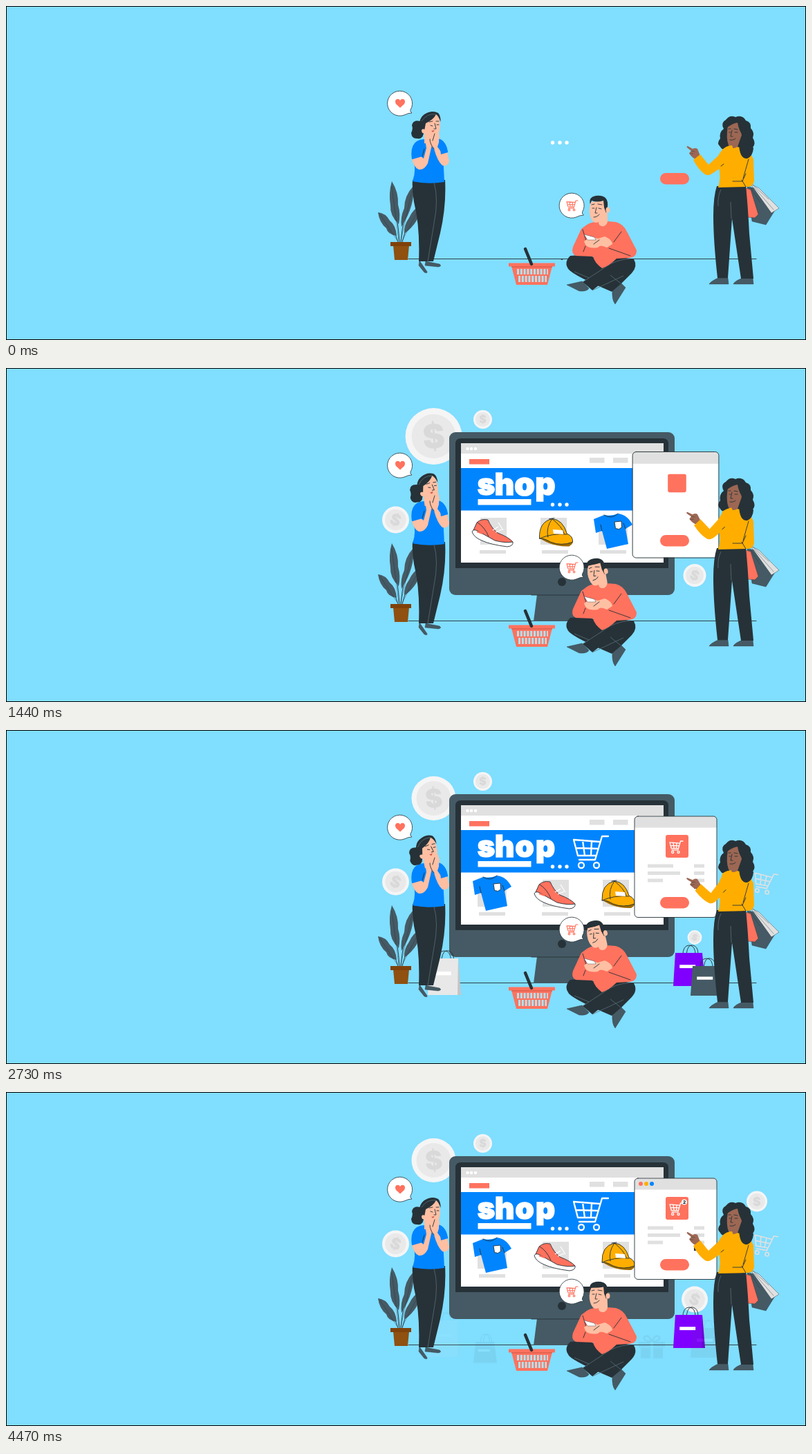
An HTML page for the animation above (4500 ms loop, 1157 px wide and 484 px high).

```html
<!DOCTYPE html>
<html lang="en">
<head>
<meta charset="utf-8">
<title>Online shopping</title>
<style>
html, body { margin: 0; width: 100%; height: 100%; overflow: hidden; background: #80deff; }
svg { display: block; width: 100%; height: 100%; }
.dark { fill: #263238; }
.slate { fill: #455a64; }
.red { fill: #ff725e; }
.blue { fill: #0085ff; }
.sun { fill: #ffae00; }
.white { fill: #fff; }
.grey { fill: #e0e0e0; }
.skin { fill: #ffbfa3; }
.tan { fill: #9c6753; }
.ink { fill: none; stroke: #263238; stroke-width: .9; stroke-linecap: round; stroke-linejoin: round; }
.seam { fill: none; stroke: #5b6d75; stroke-width: .8; }
.edge { stroke: #263238; stroke-width: .9; stroke-linejoin: round; }
.thin { stroke-width: .4; }
text { font-family: Inter, sans-serif; font-weight: 900; text-anchor: middle; }
#word { font-size: 43.5px; stroke: #fff; stroke-width: 1.6; }
</style>
</head>
<body>
<svg viewBox="0 0 1157 484" preserveAspectRatio="none">
<defs>
  <clipPath id="glass"><rect x="658" y="109" width="293" height="173"/></clipPath>
  <clipPath id="panel"><rect x="909" y="125" width="119" height="146" rx="5"/></clipPath>
  <g id="cart" fill="none" stroke-linejoin="round" stroke-linecap="round">
    <path d="M50 0H41L31 34H8M0 5L38 8M0 5L6 28H33M3 17L36 18M13 6L16 28M26 7L25 28"/>
    <circle cx="11" cy="42" r="4"/><circle cx="33" cy="42" r="4"/>
  </g>
  <path id="bubble" d="M15 9.5A18 18 0 1 0 6 17Q12 14 17 14Q14 12 15 9.5Z" fill="#fff" stroke="#263238" stroke-width=".8"/>
</defs>

<rect width="1157" height="484" fill="#80deff"/>
<path class="ink" d="M582 366.500H1085"/>
<g id="coins"></g>

<!-- monitor: data-pop = centre x, centre y, start, duration, overshoot -->
<g data-pop="804 368 0 620">
  <path class="slate" d="M768 328H840L846 367H763Z"/>
  <rect class="slate" x="641" y="93" width="326" height="236" rx="9"/>
  <path class="ink" d="M760 329H848"/>
  <path class="dark" d="M650 290V110Q650 102 658 102H950Q958 102 958 110V290Z"/>
  <circle class="dark" cx="804" cy="310" r="6"/>
</g>

<g data-pop="804.5 195.5 320 500 -1">
  <g clip-path="url(#glass)">
    <rect class="white" x="658" y="109" width="293" height="173"/>
    <rect class="grey" x="658" y="109" width="293" height="15"/>
    <g class="white"><circle cx="667.500" cy="117" r="2.200"/><circle cx="673" cy="117" r="2.200"/><circle cx="679" cy="117" r="2.200"/></g>
    <rect class="red" x="670" y="132" width="29" height="7.500"/>
    <path class="grey" d="M844 130h21.500v7.500h-21.500ZM878 130h21.500v7.500h-21.500Z"/>
    <rect class="blue" x="658" y="145" width="293" height="61.500"/>
    <rect class="white" x="682.500" y="190" width="77" height="8.500"/>
    <g id="word" class="white"></g>
    <g id="slide"><use href="#cart" x="821" y="154" stroke="#fff" stroke-width="2.300"/></g>
    <g id="track">
      <g>
        <rect class="grey" x="686" y="217" width="38" height="39" data-pop="705 236 840 400"/>
        <rect class="grey" x="685" y="264" width="38" height="5" data-grow="685 945"/>
        <g data-pop="703 238 954 400">
          <path class="red" d="M676 235L681 224Q687 218 697 220Q702 232 711 239Q727 245 733 252Q718 258 700 252Z"/>
          <path class="ink" d="M676 235L681 224Q687 218 697 220Q702 232 711 239Q727 245 733 252M682 224Q692 230 698 244"/>
          <path class="white edge" d="M674 237Q676 233 682 236L707 250Q722 254 733 252Q734 258 725 259Q701 256 688 250Q676 245 674 237Z"/>
          <path d="M681 237l8 3" stroke="#ff725e" stroke-width="2"/>
          <path d="M704 235l8-5M708 238l9-4M712 224l7 11" fill="none" stroke="#fff" stroke-width="1.200"/>
        </g>
      </g>
      <g>
        <rect class="grey" x="773" y="217" width="38" height="39" data-pop="791 236 926 400"/>
        <rect class="grey" x="775" y="264" width="38" height="5" data-grow="775 1050"/>
        <g data-pop="796 238 1090 400">
          <path d="M772 246Q790 259 814 258Q821 254 819 249L800 243Z" fill="#9c6a00"/>
          <path class="sun edge" d="M772 247Q771 223 790 219Q805 220 811 240Q820 244 819 252Q803 258 788 252Q778 246 772 247Z"/>
          <path class="ink" d="M772 247Q790 239 811 241M790 219Q781 231 784 245M790 219Q804 230 807 240M786 219l7-1"/>
          <path class="white" d="M791 234l14 1 1 6-14-1Z"/>
        </g>
      </g>
      <g id="shirt">
        <rect class="grey" x="857" y="217" width="42" height="39" data-pop="878 236 700 400"/>
        <rect class="grey" x="859" y="264" width="38" height="5" data-grow="859 880"/>
        <g data-pop="878 236 760 400">
          <path class="blue" d="M865 213Q876 215 885 211Q898 212 906 227L896 233L900 255L869 262L862 236L853 239L850 219Z"/>
          <path class="ink" d="M865 213Q876 220 885 211M862 236L860 227M896 233L893 225"/>
          <path class="white edge" d="M880 223l10-1 .5 9-4 2.500-5-1Z"/>
        </g>
      </g>
      <use href="#shirt" x="-265"/>
    </g>
  </g>
</g>
<g class="white"><circle cx="790.500" cy="198" r="2.700"/><circle cx="801" cy="198" r="2.700"/><circle cx="811" cy="198" r="2.700"/></g>

<!-- checkout card -->
<g data-pop="968.5 198 1250 450">
  <g clip-path="url(#panel)">
    <rect class="white" x="909" y="125" width="119" height="147"/>
    <rect class="grey" x="909" y="125" width="119" height="16.500"/>
  </g>
  <rect class="ink" x="909" y="125" width="119" height="146.500" rx="5"/>
  <rect class="red" x="954" y="152" width="33" height="33" rx="3" data-pop="970 168 1350 400"/>
  <g id="rows" class="grey"></g>
  <rect class="dark" x="995" y="225" width="15" height="5" data-grow="995 2650"/>
  <g data-pop="969 169 2262 400"><use href="#cart" transform="translate(960 161) scale(.38)" stroke="#fff" stroke-width="3.500"/></g>
  <g data-pop="981 159 2800 350"><circle class="white" cx="981" cy="159.500" r="4"/><text x="981" y="162" font-size="6.500" class="dark">2</text></g>
  <circle class="red" cx="918" cy="133" r="3" data-pop="918 133 3830 300"/>
  <circle class="sun" cx="926" cy="133" r="3" data-pop="926 133 3900 300"/>
  <circle class="blue" cx="934" cy="133" r="3" data-pop="934 133 3970 300"/>
</g>
<rect class="red" x="946" y="242" width="42" height="16.500" rx="8.200"/>

<g data-pop="1100 222 1900 300"><use href="#cart" transform="translate(1084 204) rotate(10) scale(.66)" stroke="#e0e0e0" stroke-width="2.400"/></g>
<g id="bags"></g>
<g id="gift" class="slate">
  <path d="M915 362h38v8h-38ZM918 371h32v15h-32Z"/>
  <path d="M934 362Q921 361 923 355Q929 350 934 362Q939 350 945 355Q947 361 934 362" fill="none" stroke="#455a64" stroke-width="2.500"/>
  <path d="M934 362V386" stroke="#80deff" stroke-width="4"/>
</g>

<!-- plant -->
<path class="ink" d="M569 342Q567 310 558 262M571 342Q574 305 587 266M567 342Q560 316 540 300M573 342Q580 312 597 292"/>
<g class="slate">
  <path d="M558 254Q568 270 567 288Q571 301 568 316Q555 304 556 289Q553 271 558 254Z"/>
  <path d="M589 261Q592 288 572 320Q570 306 576 293Q576 275 589 261Z"/>
  <path d="M538 299Q549 300 555 311Q564 318 565 333Q552 331 550 322Q540 314 538 299Z"/>
  <path d="M600 288Q600 312 576 330Q575 318 583 307Q588 295 600 288Z"/>
</g>
<path class="ink thin" d="M558 262L568 340M587 268L571 340M541 302L566 340M598 292L573 340"/>
<path d="M560 347H583L581 368H562Z" fill="#8f5010"/><rect x="556" y="342" width="30" height="6" fill="#80420a"/>

<!-- woman in blue -->
<path class="slate edge thin" d="M598 369L609 385Q610 388 605 386L597 376ZM607 370L627 374Q631 377 625 378L606 376Z"/>
<path class="dark" d="M588 252H635Q637 290 628 329L618 370H597Q599 320 590 284Q587 266 588 252Z"/>
<path class="seam" d="M619 256Q626 280 619 315L610 370"/>
<path class="blue" d="M587 222Q584 203 594 196Q602 191 612 194L626 192Q637 196 639 212L632 215L634 255Q610 259 588 254Q593 240 590 228Z"/>
<g id="herHead">
  <path class="dark" d="M602 168Q589 163 587 173Q589 178 586 184Q587 193 595 192Q602 194 604 184Z"/>
  <path class="skin" d="M604 170Q611 155 624 156Q629 165 627.500 178Q626 189 620 191L617 199H605V184Z"/>
  <path class="dark" d="M598 184Q595 164 605 157Q616 150 625 155Q629 159 628.500 168Q626 160 622 157Q618 165 607 170L605 181L602 190Z"/>
  <path class="skin" d="M606 179q-5-2-5 2q1 5 5 3Z"/>
  <path class="ink" d="M612 168l5-1M622 167l4 0M614 173l3 1M623 172l3 0M620 170l2 8-3 0"/>
  <path class="seam" d="M601 167Q609 155 622 157"/>
  <path d="M615 181l5-1-2 3Z" fill="#c84f45"/>
</g>
<g class="skin">
  <path d="M587 222L599 217L604 221L608 206L606 193Q609 187 615 185L618 192L610 228Q605 238 597 237Q590 234 587 222Z"/>
  <path d="M638 212L641 225Q639 233 631 231Q624 225 619 207L612 199Q611 190 617 184Q621 177 625 181Q629 192 624 204L631 214Z"/>
</g>
<path class="blue" d="M588 222Q584 204 595 197L602 218ZM639 212Q637 197 626 193L629 215Z"/>
<path class="ink" d="M602 218L605 207M619 207Q613 200 613 193M620 185l-3 10"/>

<!-- man -->
<path class="slate edge thin" d="M811 404L833 399L843 409Q841 414 829 413ZM877 411L889 401L896 408L881 432Q876 426 877 411Z"/>
<path class="dark" d="M816 362Q806 372 814 382Q822 391 876 414L890 402L905 387Q914 377 908 367L885 363Q860 372 842 360Z"/>
<path class="dark" d="M834 400L866 378L884 384L848 412Z"/>
<path class="seam" d="M834 400L866 379Q880 368 903 366M848 412L893 391M822 385L843 394M874 390L889 402"/>
<path class="red" d="M840 317Q850 310 882 313Q893 316 898 327L912 354Q912 365 900 365L883 366Q873 376 862 380Q851 372 849 363L824 362Q817 359 820 349L832 323Z"/>
<path class="ink" d="M834 324l5 16M879 342l11-15M872 351l31 11M838 348L835 356"/>
<path class="skin" d="M836 341Q845 334 856 337L866 334Q876 338 877 345L869 350Q859 345 856 350Q843 352 838 346Z"/>
<path class="white edge thin" d="M836 331L851 335L853 339L841 339Z"/>
<path class="ink" d="M850 345l8-6"/>
<g id="hisHead">
  <path class="skin" d="M846 284Q842 295 845 305Q849 317 857 313Q857 320 865 319Q871 316 870 309L869 282Z"/>
  <path class="dark" d="M845 287Q842 277 853 275Q872 273 870 291L868 300L865 292L864 282Q855 285 847 282Z"/>
  <ellipse class="skin" cx="870.500" cy="295.500" rx="3" ry="4"/>
  <path class="ink" d="M847 288l4-1M856 287l6 1M848 293l3 0M857 293l4 1M854 292l-2 8 3 0M850 306q5 0 8-4"/>
</g>
<use href="#bubble" x="570" y="141"/>
<path class="red" d="M570 147.500L564 142Q561.500 137 565 135Q568.500 134 570 137Q571.500 134 575 135Q578.500 137 576 142Z"/>
<use href="#bubble" x="818.500" y="289"/>
<use href="#cart" transform="translate(811 282) scale(.32)" stroke="#ff725e" stroke-width="3.500"/>

<!-- basket -->
<path class="red" d="M731 377H790L783 404H738Z"/>
<rect class="red" x="727" y="372.500" width="67" height="5"/>
<path d="M731 378H790" stroke="#c95849"/>
<g stroke="#b5e0ec" stroke-dasharray="3 1.800"><path d="M739 385H784" stroke-width="8"/><path d="M741 395.500H782" stroke-width="9"/></g>
<path d="M751 352L760 374" stroke="#263238" stroke-width="4.500" stroke-linecap="round"/>

<!-- woman in yellow -->
<path class="slate edge thin" d="M1072 262L1084 264L1112 296L1099 317L1079 312Z"/>
<path class="grey edge thin" d="M1077 258L1089 264L1118 293L1107 300Z"/>
<path class="red edge thin" d="M1070 264L1077 266L1088 302L1083 307L1071 306Z"/>
<path class="ink thin" d="M1070 252L1090 284M1070 250L1103 280M1082 263l28 32"/>
<path class="slate edge thin" d="M1017 403Q1019 399 1030 394H1044L1045 403ZM1052 403Q1054 398 1066 394H1080L1081 403Z"/>
<path class="dark" d="M1028 261H1070Q1073 290 1075 330L1081 395H1063L1050 308L1044 394H1029Q1023 340 1023 304Q1023 276 1028 261Z"/>
<path class="seam" d="M1049 308L1048 284M1034 266Q1029 276 1030 290"/>
<path class="dark" d="M1038 178Q1033 169 1041 165Q1047 157 1055 161Q1065 157 1070 166Q1078 168 1077 177Q1083 183 1080 191Q1085 199 1080 205Q1081 214 1073 220Q1063 224 1060 214L1048 206Q1036 211 1033 204Q1027 199 1033 192Q1031 183 1038 178Z"/>
<path class="sun" d="M1036 208Q1045 201 1062 205Q1075 208 1081 222L1082 254Q1080 263 1071 262L1030 263Q1035 246 1030 231Z"/>
<path class="dark" d="M1060 200Q1078 198 1081 206Q1080 218 1072 221Q1061 222 1060 200Z"/>
<path class="tan" d="M1044 173Q1051 166 1061 170L1064 187L1058 204Q1050 209 1045 202Q1041 192 1044 173Z"/>
<path class="dark" d="M1043 176Q1051 170 1058 169Q1060 181 1066 188L1070 174L1058 163L1043 167Z"/>
<path class="ink" d="M1045 178l3 0M1053 178l5 1M1046 183l2 0M1054 183l4 0M1050 180l-2 9 3 0M1047 194q5 1 8-2"/>
<path class="ink" d="M1074 222L1066 250M1051 254h14l5-11M1064 252l6 10"/>
<g id="arm">
  <path class="tan" d="M1004 217L1000 207Q997 205 993 207L986 203Q983 203 986 206L991 210L988 213Q991 219 997 222Z"/>
  <path class="ink thin" d="M991 210l5 1M989 214l5 0"/>
  <path class="sun" d="M1050 202Q1038 202 1030 217L1016 230L1004 215L994 223Q1002 238 1011 244Q1016 247 1024 241L1040 230L1056 220Z"/>
  <path class="ink" d="M1034 232l4-3"/>
</g>
<rect x=".5" y=".5" width="1156" height="483" fill="none" stroke="#000"/>
</svg>

<script>
const LOOP = 4500;
const $ = id => document.getElementById(id);
const clamp = x => Math.min(1, Math.max(0, x));
const mix = (t, start, dur) => clamp((t - start) / dur);
const outQuad = u => 1 - (1 - u) ** 2;
const outCubic = u => 1 - (1 - u) ** 3;
const inOut = u => u < .5 ? 2 * u * u : 1 - 2 * (1 - u) ** 2;
const outBack = (u, c = 1.7) => 1 + (c + 1) * (u - 1) ** 3 + c * (u - 1) ** 2;

// Straight segments through [time, value] pairs
function keys(t, points) {
  for (let i = 1; i < points.length; i++) {
    const [a, x] = points[i - 1], [b, y] = points[i];
    if (t <= b) return x + (y - x) * mix(t, a, b - a);
  }
  return points.at(-1)[1];
}

const coin = (x, y, r, tilt, attr) => `<g ${attr}>
  <circle cx="${x}" cy="${y}" r="${r}" fill="#f5f5f5"/>
  <circle cx="${x}" cy="${y}" r="${r * .78}" fill="#e9e9e9"/>
  <text x="${x}" y="${y + r * .42}" font-size="${r * 1.18}" fill="#d9d9d9" transform="rotate(${tilt} ${x} ${y})">$</text></g>`;
const popCoin = (x, y, r, tilt, start, over = 1.7) =>
  coin(x, y, r, tilt, `data-pop="${x} ${y} ${start} 450 ${over}"`);

$('coins').innerHTML = popCoin(618.5, 99, 32, -5, 1150, 4) + popCoin(689.5, 74.5, 13.5, 0, 640)
  + popCoin(563.5, 220, 19.5, 20, 560) + popCoin(1086, 158.5, 15, 0, 2750)
  + coin(996, 300.5, 19, 20, 'id="pulse"');

const letterX = [694.5, 721, 750, 780];
$('word').innerHTML = [...'shop'].map((c, i) =>
  `<text x="${letterX[i]}" y="183.500" data-pop="${letterX[i]} 171 ${950 + i * 110} 400">${c}</text>`).join('');

$('rows').innerHTML = [37, 47, 22].map((w, i) => {
  const y = 194.5 + i * 10.5, start = 1450 + i * 50;
  return `<rect x="928" y="${y}" width="${w}" height="5" data-grow="928 ${start}"/>
    <rect x="995" y="${y}" width="15" height="5" data-grow="995 ${start}"/>`;
}).join('');

const bag = (id, x, y, w, h, fill, attr = '') => `<g id="${id}" ${attr}>
  <path class="ink" d="M${x + w * .3} ${y + 4}q0-15 ${w * .2}-15t${w * .2} 15M${x + w * .42} ${y}q2-13 ${w * .2}-11t${w * .16} 11"/>
  <path d="M${x + 3} ${y}h${w - 7}l4 ${h}h${-w}Z" fill="${fill}"/>
  <path d="M${x + w - 4} ${y}l4 ${h}h-5Z" opacity=".15"/>
  <rect x="${x + w * .2}" y="${y + h * .36}" width="${w * .5}" height="${h * .1}" fill="#fff"/></g>`;

$('bags').innerHTML = bag('pale', 610, 331, 48, 53, '#e8e8e8', 'data-pop="612 383 1600 400"')
  + bag('small', 676, 362, 34, 30.5, '#455a64')
  + bag('purple', 965, 323, 46, 48, '#8000ff') + bag('slate', 990, 342, 46, 43, '#455a64');

const numbers = s => s.split(' ').map(Number);
const pops = [...document.querySelectorAll('[data-pop]')].map(el => [el, ...numbers(el.dataset.pop)]);
const grows = [...document.querySelectorAll('[data-grow]')].map(el => [el, ...numbers(el.dataset.grow)]);

function zoom(el, x, y, sx, sy = sx, dy = 0) {
  el.setAttribute('transform', `translate(${x} ${y + dy}) scale(${sx} ${sy}) translate(${-x} ${-y})`);
}
const shift = (id, x) => $(id).setAttribute('transform', `translate(${x} 0)`);
const turn = (id, angle, x, y) => $(id).setAttribute('transform', `rotate(${angle} ${x} ${y})`);

// Falls onto the ground point (x, y) while fading in and growing to full size
function drop(id, x, y, t, start, height, fade) {
  const u = mix(t, start, 400), size = .9 + .1 * u;
  zoom($(id), x, y, size, size, height * (inOut(u) - 1));
  $(id).setAttribute('opacity', u > 0 ? clamp(.18 + 1.05 * u) * fade : 0);
}

function draw(t) {
  for (const [el, x, y, start, dur, over] of pops) {
    const u = mix(t, start, dur);
    zoom(el, x, y, over === -1 ? outCubic(u) : outBack(u, over));
  }
  for (const [el, x, start] of grows) zoom(el, x, 0, outQuad(mix(t, start, 250)), 1);

  zoom($('pulse'), 996, 300.5, keys(t, [[600, 0], [990, .95], [1200, 1], [1600, .78], [1830, .61],
    [2310, .29], [2500, 0], [2900, .95], [3200, 1.08], [3600, 1]]));
  shift('slide', 131 * (1 - outQuad(mix(t, 1600, 940))));
  shift('track', 90 * outBack(mix(t, 1850, 550)));

  const fade = 1 - .99 * mix(t, 4120, 375);
  $('pale').setAttribute('opacity', fade);
  drop('slate', 1013, 385, t, 2150, 232, fade);
  drop('purple', 988, 371, t, 2280, 301, 1);
  drop('small', 693, 392, t, 2780, 238, fade);
  drop('gift', 934, 386, t, 3420, 282, fade);

  const sway = (1 - Math.cos(2 * Math.PI * t / LOOP)) / 2;
  turn('hisHead', -12 * sway, 862, 314);
  turn('herHead', -14 * sway ** 1.5, 612, 195);
  turn('arm', -13 * sway ** 3, 1056, 212);
}

function frame() {
  draw(performance.now() % LOOP);
  requestAnimationFrame(frame);
}
frame();
</script>
</body>
</html>
```
